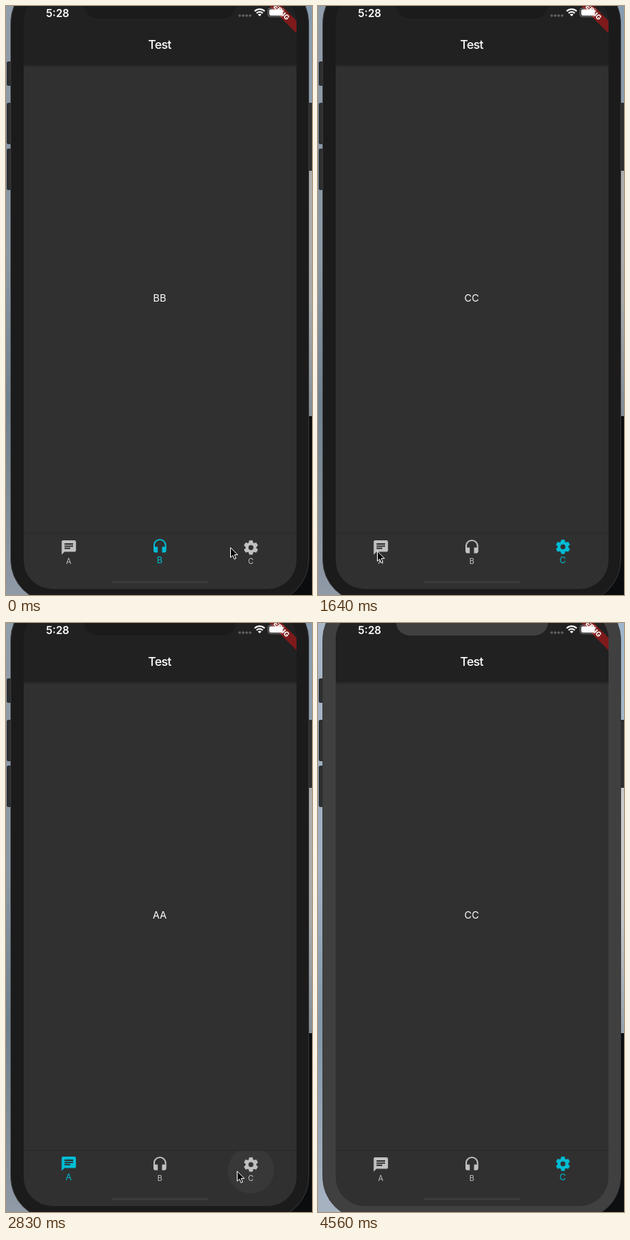
Recreate the animation shown at these times as an HTML page. Size 415 by 797 pixels, loop 4.66 s.

```html
<!DOCTYPE html>
<html lang="en">
<head>
<meta charset="utf-8">
<title>Tab bar</title>
<style>
  html, body { margin: 0; width: 100%; height: 100%; overflow: hidden; background: #1b1b1b; }
  svg { display: block; }
  text { font-family: Inter, sans-serif; fill: #fff; text-anchor: middle; }
  .bezel { fill: var(--bezel); }
</style>
</head>
<body>
<svg id="stage" width="415" height="797" viewBox="0 0 415 797">
  <defs>
    <linearGradient id="left" x2="0" y2="1">
      <stop stop-color="#a9b8c8"/>
      <stop offset=".3" stop-color="#a0b0c0"/>
      <stop offset=".42" stop-color="#a3b3c3"/>
      <stop offset=".68" stop-color="#8298a8"/>
      <stop offset="1" stop-color="#a8b3c2"/>
    </linearGradient>
    <linearGradient id="right" x2="0" y2="1">
      <stop stop-color="#9db6cd"/>
      <stop offset=".17" stop-color="#a3b7c9"/>
      <stop offset=".3" stop-color="#cbcac8"/>
      <stop offset=".5" stop-color="#c3c5c7"/>
      <stop offset=".7" stop-color="#94a2ad"/>
    </linearGradient>
    <clipPath id="screen"><rect x="24" y="-17" width="370" height="806" rx="39"/></clipPath>
    <clipPath id="bar"><rect x="24" y="714.5" width="370" height="75"/></clipPath>
    <filter id="soft"><feGaussianBlur stdDeviation="1.5"/></filter>
  </defs>

  <!-- desktop -->
  <rect width="200" height="797" fill="url(#left)"/>
  <rect x="200" width="215" height="797" fill="url(#right)"/>
  <rect x="300" y="555" width="120" height="260" rx="5" fill="#0d0e10"/>
  <rect id="shade" width="415" height="797"/>

  <!-- phone -->
  <g fill="#2c2e30">
    <rect x="1" y="75" width="8" height="33" rx="2"/>
    <rect x="1" y="131" width="8" height="56" rx="2"/>
    <rect x="1" y="193" width="8" height="56" rx="2"/>
    <rect x="408" y="131" width="9" height="92" rx="2"/>
  </g>
  <rect class="bezel" x="6.5" y="-34.5" width="404" height="841" rx="57" stroke="#383838"/>

  <g clip-path="url(#screen)">
    <rect x="24" y="-17" width="370" height="806" fill="#303030"/>
    <rect x="20" y="0" width="380" height="80.5" opacity=".35" filter="url(#soft)"/>
    <rect x="24" y="-17" width="370" height="96" fill="#212121"/>
    <text x="208.4" y="57.5" font-size="16.5" font-weight="500" letter-spacing="-.6">Test</text>
    <text id="page" x="208.4" y="400" font-size="13.5"></text>

    <rect x="24" y="713" width="370" height="1.2" fill="#2a2a2a"/>
    <circle id="ripple" cy="740.5" r="31.3" fill="#ebffff" clip-path="url(#bar)"/>
    <g id="tabs"></g>
    <rect x="144" y="778" width="130" height="3" rx="1.5" fill="#3b3b3b"/>

    <g transform="translate(371.3 5.8) rotate(45)">
      <rect x="-60" y="-6" width="120" height="12" fill="#7e1a1b"/>
      <text y="3.4" font-size="9.4" font-weight="800">DEBUG</text>
    </g>
  </g>
  <path class="bezel" d="M106 0C107 10 114 17 127 17H291C304 17 311 10 312 0Z"/>

  <!-- status bar -->
  <text x="70" y="14.5" font-size="14.3" font-weight="600">5:28</text>
  <path d="M317 13H332" stroke="#626262" stroke-width="3.6" stroke-linecap="round" stroke-dasharray="0 4.7"/>
  <g fill="none" stroke="#fff" stroke-width="2">
    <path d="M337.2 7A9.6 9.6 0 0 1 350.8 7M339.8 9.7A6 6 0 0 1 348.2 9.7"/>
    <path d="M344 14L341.6 11.6A3.4 3.4 0 0 1 346.4 11.6Z" fill="#fff" stroke="none"/>
  </g>
  <rect x="355.5" y="3" width="21.5" height="11.4" rx="3" fill="none" stroke="#fff" stroke-opacity=".4"/>
  <rect x="357" y="4.5" width="18.5" height="8.4" rx="1.8" fill="#fff"/>

  <path id="cursor" d="M.5 .8V14.2L3.6 11.4 5.7 16.4 8 15.4 5.9 10.6H10.2Z" stroke="#fff"/>
</svg>
<script>
const LOOP = 4660;
const UNFOCUSED = 4560;
const $ = id => document.getElementById(id);

const TOOTH = 'M-2.1-9.6H2.1L2.9-6H-2.9Z';
const ICONS = [
  '<path d="M20 2H4c-1.1 0-2 .9-2 2L2 22l4-4h14c1.1 0 2-.9 2-2V4c0-1.1-.9-2-2-2zM6 9h12v2H6V9zm8 5H6v-2h8v2zm4-6H6V6h12v2z"/>',
  '<path d="M12 1c-5 0-9 4-9 9v7c0 1.7 1.3 3 3 3h3v-8H5v-2c0-3.9 3.1-7 7-7s7 3.1 7 7v2h-4v8h3c1.7 0 3-1.3 3-3v-7c0-5-4-9-9-9z"/>',
  '<g transform="translate(12 12)"><circle r="5.5" fill="none" stroke="currentColor" stroke-width="4"/>' +
    [0, 60, 120, 180, 240, 300].map(a =>
      `<path d="${TOOTH}" transform="rotate(${a})" stroke="currentColor" stroke-width=".8" stroke-linejoin="round"/>`).join('') + '</g>'
];
const tabX = i => 85.2 + i * 123.5;

$('tabs').innerHTML = ICONS.map((icon, i) =>
  `<g fill="currentColor"><g>${icon}</g><text x="${tabX(i) - .2}" style="fill:currentColor">${'ABC'[i]}</text></g>`).join('');
const tabs = [...$('tabs').children];

// time, x, y of the pointer tip
const POINTER = [
  [0, 304, 732], [150, 317, 732], [300, 319, 732], [900, 313, 732],
  [1050, 146, 737], [1200, 99, 738], [1340, 81, 738], [1640, 80, 737],
  [2090, 96, 740], [2230, 213, 749], [2380, 266, 751], [2530, 302, 747],
  [2680, 313, 741], [3270, 313, 744], [3410, 330, 789], [3560, 330, 900]
];
// time, page, how selected each tab is, rippling tab, ripple opacity
const STATES = [
  [0, 'BB', [0, 1, 0], 2, 0],
  [450, 'BB', [0, 1, 0], 2, .09],
  [600, 'CC', [0, .1, .9], 2, .13],
  [750, 'CC', [0, 0, 1], 2, 0],
  [1790, 'AA', [0, 0, 1], 0, .1],
  [1940, 'AA', [1, 0, 0], 0, .035],
  [2090, 'AA', [1, 0, 0], 0, 0],
  [2830, 'AA', [1, 0, 0], 2, .04],
  [2970, 'CC', [.1, 0, .9], 2, .13],
  [3120, 'CC', [0, 0, 1], 2, 0]
];
const at = (steps, t) => steps.findLast(step => step[0] <= t);
const mix = (a, b, k) => a + (b - a) * k;

function drawTab(tab, i, k) {
  const [icon, label] = tab.children;
  tab.style.color = `rgb(${mix(193, 0, k)}, ${mix(193, 188, k)}, ${mix(193, 212, k)})`;
  icon.setAttribute('transform', `translate(${tabX(i)} ${mix(732.8, 731.8, k)}) scale(.97) translate(-12 -12)`);
  label.setAttribute('y', mix(755, 754, k));
  label.setAttribute('font-size', mix(10.3, 12, k));
}

function draw(now) {
  const t = now % LOOP;
  const [, x, y] = at(POINTER, t);
  const [, page, selected, rippleTab, opacity] = at(STATES, t);
  const lit = t >= UNFOCUSED;
  $('stage').style.setProperty('--bezel', lit ? '#404040' : '#1b1b1b');
  $('shade').setAttribute('opacity', lit ? 0 : .14);
  $('cursor').setAttribute('transform', `translate(${x} ${y})`);
  $('page').textContent = page;
  $('ripple').setAttribute('cx', tabX(rippleTab));
  $('ripple').setAttribute('opacity', opacity);
  tabs.forEach((tab, i) => drawTab(tab, i, selected[i]));
}

const start = performance.now();
(function frame() {
  draw(performance.now() - start);
  requestAnimationFrame(frame);
})();
</script>
</body>
</html>
```
